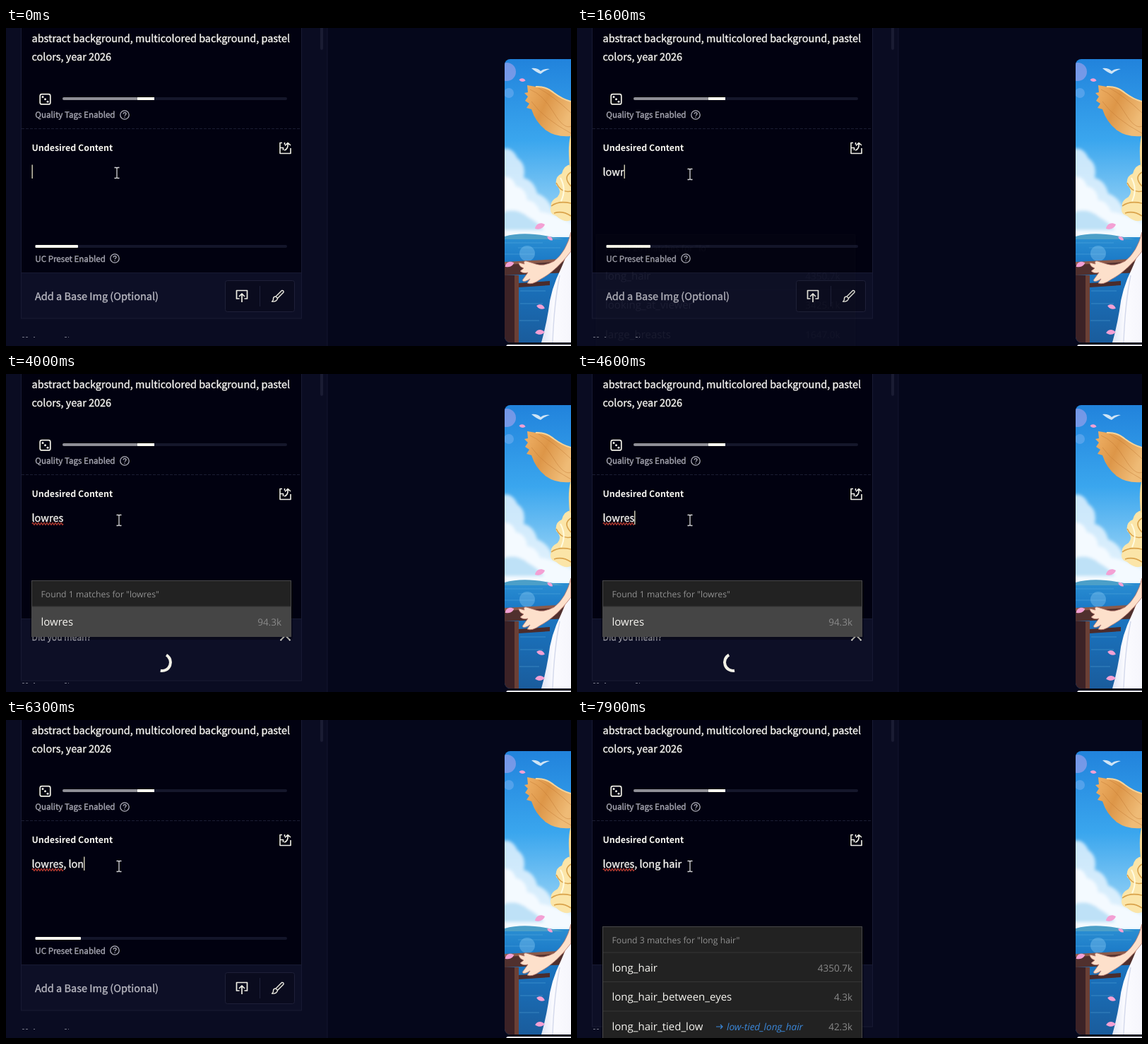
Recreate the animation shown at these times as an HTML page. Size 800 px wide and 450 px high, loop 8 s.

```html
<!DOCTYPE html>
<html lang="en">
<head>
<meta charset="utf-8">
<style>
html, body { margin: 0; width: 100%; height: 100%; overflow: hidden; background: #05071b; }
svg { display: block; width: 800px; height: 450px; text-rendering: geometricPrecision; }
text { white-space: pre; font: 500 14.48px "Noto Sans CJK JP", "Noto Sans CJK SC", "Noto Sans", sans-serif; color: #f6f5f0; fill: currentColor; stroke: currentColor; stroke-width: .35; }
text.label { font-size: 11.6px; color: #a9a9b3; }
text.title { font-size: 12.4px; font-weight: 700; stroke: none; }
.line { fill: none; stroke: #f1f0e6; stroke-width: 1.7; stroke-linejoin: round; }
#popup text { font: 400 15px "Open Sans", "Noto Sans", sans-serif; stroke: none; }
#popup text.head { font-size: 12.2px; color: #919191; }
#popup text.count { font-size: 13.5px; color: #898989; text-anchor: end; }
#popup text.alias { font-size: 13.6px; font-style: italic; color: #3b87d8; }
</style>
</head>
<body>
<svg viewBox="0 0 800 450">
  <defs>
    <linearGradient id="sky" x2="0" y2="1">
      <stop stop-color="#2183dc"/><stop offset=".45" stop-color="#3aa6ee"/><stop offset="1" stop-color="#b4e0f8"/>
    </linearGradient>
    <linearGradient id="sea" x2="0" y2="1">
      <stop stop-color="#2a8ed2"/><stop offset=".25" stop-color="#1a78c6"/><stop offset="1" stop-color="#1a5c9c"/>
    </linearGradient>
    <linearGradient id="straw" x2="1" y2=".5">
      <stop stop-color="#f0b268"/><stop offset=".5" stop-color="#dd9648"/><stop offset="1" stop-color="#efbb76"/>
    </linearGradient>
    <linearGradient id="dress">
      <stop stop-color="#dfe4f4"/><stop offset=".4" stop-color="#fbfbff"/><stop offset="1" stop-color="#f6f6fc"/>
    </linearGradient>
    <filter id="soft"><feGaussianBlur stdDeviation="2"/></filter>
    <clipPath id="frame"><rect x="706" y="44" width="110" height="401" rx="8"/></clipPath>
    <path id="petal" d="M-7 3C-6-4 1-7 7-3C5 2 0 5-7 3Z" fill="#f3a0d4"/>
    <g id="help"><circle r="6.2" class="line" style="stroke:#b0b0ba;stroke-width:1.3"/><path d="M-2.1-1.4Q-1.8-3.4 0-3.4Q2.2-3.2 2.1-1.5Q1.9-.4 0 .9M0 2.4V3.7" class="line" style="stroke:#b0b0ba;stroke-width:1.3"/></g>
  </defs>

  <!-- page -->
  <rect width="455" height="450" fill="#0a0c22"/>
  <path d="M455 0V450" stroke="#15172e"/>
  <rect x="445" y="-4" width="4" height="35" rx="2" fill="#1a1c33"/>
  <rect id="panel" x="21.5" y="-5" width="397" height="416" fill="#0d0f26" stroke="#181a33"/>
  <rect x="22" width="396" height="346" fill="#010110"/>
  <path d="M22 142.5H418" stroke="#1b1d33" stroke-dasharray="4 2"/>
  <path d="M22 346.5H418" stroke="#181a33"/>
  <path d="M23 437.5H32M39 437.5H41M83 437.5H89" stroke="#777988" stroke-dasharray="3 2"/>

  <text x="36.5" y="20">abstract background, multicolored background, pastel</text>
  <text x="36.5" y="46">colors, year 2026</text>
  <rect x="48.2" y="93.7" width="14.6" height="14.2" rx="2.5" class="line"/>
  <g fill="#f1f0e6"><circle cx="52" cy="97.5" r="1.5"/><circle cx="55.5" cy="100.8" r="1.5"/><circle cx="59" cy="104.2" r="1.5"/></g>
  <rect x="80" y="98" width="318" height="4" rx="2" fill="#15172b"/>
  <rect x="80" y="98" width="107" height="4" rx="2" fill="#8f8f96"/>
  <rect x="186" y="98" width="24" height="4" fill="#fffef2"/>
  <text x="41.3" y="127" class="label">Quality Tags Enabled</text>
  <use href="#help" x="168" y="123"/>

  <text x="36.5" y="173.5" class="title">Undesired Content</text>
  <path class="line" style="stroke-width:1.6" d="M391 162.5H388V177.5H403V170M388 169.500H392.500V173M394 173Q400 171.500 399 163M395 166.500L399 162.500L403 166M394.500 162V165"/>
  <path id="squiggle" fill="none" stroke="#b23a30" stroke-width="1.3"/>
  <text id="typed" x="36.5" y="209"></text>
  <rect id="caret" y="193.5" width="1.3" height="19.5" fill="#e6e2c4"/>
  <path id="mouse" fill="none" stroke="#d5d5d5" stroke-width="1.3" d="M-3.5-7.5H-1L0-6.5L1-7.5H3.5M0-6.5V6.5M-3.5 7.5H-1L0 6.5L1 7.5H3.5"/>

  <g id="preset">
    <rect x="41.5" y="307" width="356.5" height="4" rx="2" fill="#13152a"/>
    <rect id="usage" x="41.5" y="307" height="4" rx="1" fill="#fffef2"/>
    <text x="41.3" y="330.5" class="label">UC Preset Enabled</text>
    <use href="#help" x="154" y="326"/>
    <text x="41" y="385" style="font-size:14.5px;color:#b9b9c2">Add a Base Img (Optional)</text>
    <rect x="310.5" y="357.5" width="98" height="44" rx="3" fill="#0a0b1e" stroke="#1e2038"/>
    <path d="M359.5 365V394" stroke="#1e2038"/>
    <path class="line" d="M330.5 383H326.5V371.5H341.5V383H337.5M334 388V376.5M330 380L334 376L338 380"/>
    <path class="line" style="stroke-width:1.4" d="M382 380L390.5 371.5Q393.5 371 393 374L384.5 382.5ZM381.5 380Q378 380.5 378.5 384Q378.3 386 376.5 387Q382.5 388 384.5 383"/>
  </g>
  <g id="suggest">
    <text x="36.5" y="377" class="label" style="font-size:12.2px">Did you mean?</text>
    <path class="line" style="stroke-width:2" d="M388.5 377L395.5 370L402.5 377"/>
    <path id="spinner" class="line" style="stroke-width:4" d="M12 0A12 12 0 0 1 -11.3 4"/>
  </g>
  <g id="popup"></g>

  <!-- picture -->
  <g clip-path="url(#frame)">
    <rect x="706" y="44" width="94" height="256" fill="url(#sky)"/>
    <g fill="#f4faff" filter="url(#soft)">
      <path d="M700 172Q716 166 724 184Q737 192 733 212Q748 216 752 234Q768 240 774 258Q790 260 806 270V298H700Z" opacity=".75"/>
      <path d="M700 212Q716 206 722 224Q736 226 738 244Q750 244 756 260Q775 262 806 280V296H700Z"/>
      <path d="M700 262Q722 252 740 268Q752 274 762 286H700Z" fill="#a8d8f4" opacity=".7"/>
    </g>
    <rect x="706" y="296" width="94" height="149" fill="url(#sea)"/>
    <path d="M706 295Q730 288 764 294L790 299H706Z" fill="#4c9fc8"/>
    <path d="M706 304H760M725 311H785M706 320H748M728 372H764M728 390H760M727 414H755" stroke="#62b4e2" opacity=".4"/>
    <circle cx="738" cy="319" r="11" fill="#a7dcff" opacity=".3"/>
    <circle cx="709" cy="62" r="13" fill="#b7a7ee" opacity=".55"/>
    <circle cx="712" cy="92" r="7" fill="#8fb9f5" opacity=".4"/>
    <path d="M744 57Q752 56 757 61Q762 57 770 58Q763 60 757 65Q751 63 744 57Z" fill="#cfe4f5"/>
    <!-- railing -->
    <path d="M706 332L800 327V346L706 350Z" fill="#50302e"/>
    <path d="M706 331L800 326V330L706 335Z" fill="#8b5a4a"/>
    <path d="M706 350H726V445H706Z" fill="#3c2226"/>
    <path d="M720 350H726V445H720Z" fill="#6b4036"/>
    <path d="M726 361L770 358V364L726 367Z" fill="#4b2c2c"/>
    <!-- figure -->
    <path d="M800 286Q797 318 786 340Q771 370 768 400Q764 424 758 445H800Z" fill="url(#dress)"/>
    <path d="M784 350Q776 390 774 445" fill="none" stroke="#d5daec" stroke-width="1.5"/>
    <path d="M800 289Q793 317 776 330Q761 338 750 334L737 330Q732 329 734 334L726 332Q726 337 733 340L728 344Q732 348 739 346L731 357Q733 361 742 355L738 361Q745 364 756 356Q778 345 800 316Z" fill="#fde0cb" stroke="#b8776b" stroke-width=".8"/>
    <path d="M800 193Q790 194 787 206Q777 210 779 222Q788 231 781 239Q770 245 772 252Q768 263 779 266Q790 276 800 272Z" fill="#fbe5a8"/>
    <path d="M800 204Q788 211 800 224M779 219Q786 234 800 231M772 252Q782 244 800 248M776 262Q788 258 800 266" fill="none" stroke="#d9a24a" stroke-width="1.6"/>
    <path d="M785 212Q794 228 786 245" fill="none" stroke="#fffbe0" stroke-width="2"/>
    <path d="M800 150Q795 164 798 196H800Z" fill="#f6d691"/>
    <path d="M738 81L750 83Q764 82 776 92Q788 101 800 104V153Q779 155 765 145Q750 134 744 115L737 113L741 107L735 103L739 97L734 92L739 91Z" fill="url(#straw)"/>
    <path d="M742 87Q760 94 775 119T800 139M744 104Q761 128 800 149M754 85Q773 95 800 120" fill="none" stroke="#b9702d" opacity=".4"/>
    <path d="M750 83Q764 82 776 92Q788 101 800 104" fill="none" stroke="#f8d49a" stroke-width="2"/>
    <use href="#petal" x="756" y="281"/>
    <use href="#petal" transform="translate(770 298) rotate(55) scale(.6)"/>
    <use href="#petal" transform="translate(713 335) scale(.9)"/>
    <use href="#petal" transform="translate(757 395) rotate(40) scale(.8)"/>
    <use href="#petal" transform="translate(756 431) rotate(20) scale(.9)"/>
    <use href="#petal" transform="translate(731 74) rotate(30) scale(.6)"/>
  </g>
  <rect x="708" y="448" width="100" height="8" rx="3" fill="#f2f2f4"/>
</svg>
<script>
const $ = id => document.getElementById(id);
const LOOP = 8000;

// [time, field contents]
const typing = [
  [0, ""], [900, "l"], [1100, "lo"], [1350, "low"], [1550, "lowr"], [2150, "lowre"], [2400, "lowres"],
  [5200, "lowres, "], [5900, "lowres, l"], [6050, "lowres, lo"], [6200, "lowres, lon"], [6350, "lowres, long"],
  [6600, "lowres, long "], [6700, "lowres, long h"], [6850, "lowres, long ha"],
  [7100, "lowres, long hai"], [7300, "lowres, long hair"]
];

const popups = [
  { from: 1200, to: 1700, n: 20, query: "lo", rows: [["long_hair", "4350.7k"], ["looking_at_viewer", "3425.1k"], ["large_breasts", "1647.0k"]] },
  { from: 2700, to: 5200, n: 1, query: "lowres", rows: [["lowres", "94.3k"]] },
  { from: 6500, to: 7600, n: 20, query: "long", rows: [["long_hair", "4350.7k"], ["long_sleeves", "1568.7k"], ["long_ears", "72.1k"]] },
  { from: 7600, to: LOOP, n: 3, query: "long hair", rows: [["long_hair", "4350.7k"], ["long_hair_between_eyes", "4.3k"], ["long_hair_tied_low", "42.3k", "low-tied_long_hair"]] }
];

function popupMarkup({ n, query, rows }, selected) {
  const scrolls = n > 3, right = scrolls ? 395 : 403;
  const height = rows.length > 1 ? 170 : 79;
  let out = `<rect x="34" y="294" width="372" height="${height + 3}" rx="3" fill="#000" opacity=".3"/>
    <rect x="36.5" y="292.5" width="367" height="${height}" fill="#222" stroke="#484848"/>
    <text class="head" x="49.5" y="316">Found ${n} matches for "${query}"</text>`;
  rows.forEach(([tag, count, alias], i) => {
    const y = 329 + i * 41.5;
    if (selected && !i) out += `<rect x="37" y="${y}" width="366" height="42" fill="#454545"/>`;
    out += `<path d="M37 ${y}H${right}" stroke="#363636"/>
      <text x="49.5" y="${y + 26.5}">${tag}</text>
      <text class="count" x="${scrolls ? 382 : 390}" y="${y + 26.5}">${count}</text>`;
    if (alias) out += `<path d="M197 ${y + 22}h9m-3-3l3 3l-3 3" fill="none" stroke="#3b87d8" stroke-width="1.2"/>
      <text class="alias" x="212" y="${y + 26.5}">${alias}</text>`;
  });
  return out;
}

let wave = "M37 212";
for (let x = 37; x < 81; x += 4) wave += "q1-3 2 0t2 0";
$("squiggle").setAttribute("d", wave);

const show = (id, on) => $(id).setAttribute("visibility", on ? "visible" : "hidden");
let shown = "";

function draw(t) {
  const [keyTime, value] = typing.findLast(([at]) => at <= t);
  $("typed").textContent = value;
  $("caret").setAttribute("x", 36.5 + (value ? $("typed").getComputedTextLength() : 0));
  show("caret", Math.floor((t - keyTime) / 500) % 2 === 0);
  show("squiggle", t >= 3400);

  const move = Math.min(1, Math.max(0, (t - 500) / 200));
  $("mouse").setAttribute("transform", `translate(${157 + 3 * move} ${205 + 2 * move})`);
  $("usage").setAttribute("width", value.length > 6 ? 64.5 : value.length > 2 ? 62.5 : 60.5);

  const popup = popups.find(p => t >= p.from && t < p.to);
  const fading = t >= 1500 && t < 1700;
  const open = !!popup && !fading;
  const selected = t >= 3400 && t < 5200;
  const markup = popup ? popupMarkup(popup, selected) : "";
  if (markup !== shown) $("popup").innerHTML = shown = markup;
  $("popup").setAttribute("opacity", fading ? .06 : 1);
  $("popup").setAttribute("transform", `translate(${fading ? -9.5 : 0})`);

  show("preset", !open);
  show("suggest", open);
  $("panel").setAttribute("height", open ? 439 : 416);
  $("spinner").setAttribute("transform", `translate(221 408) rotate(${20 + (t - 2800) * 280 / 1200})`);
}

const start = performance.now();
function tick() {
  draw((performance.now() - start) % LOOP);
  requestAnimationFrame(tick);
}
tick();
</script>
</body>
</html>
```
